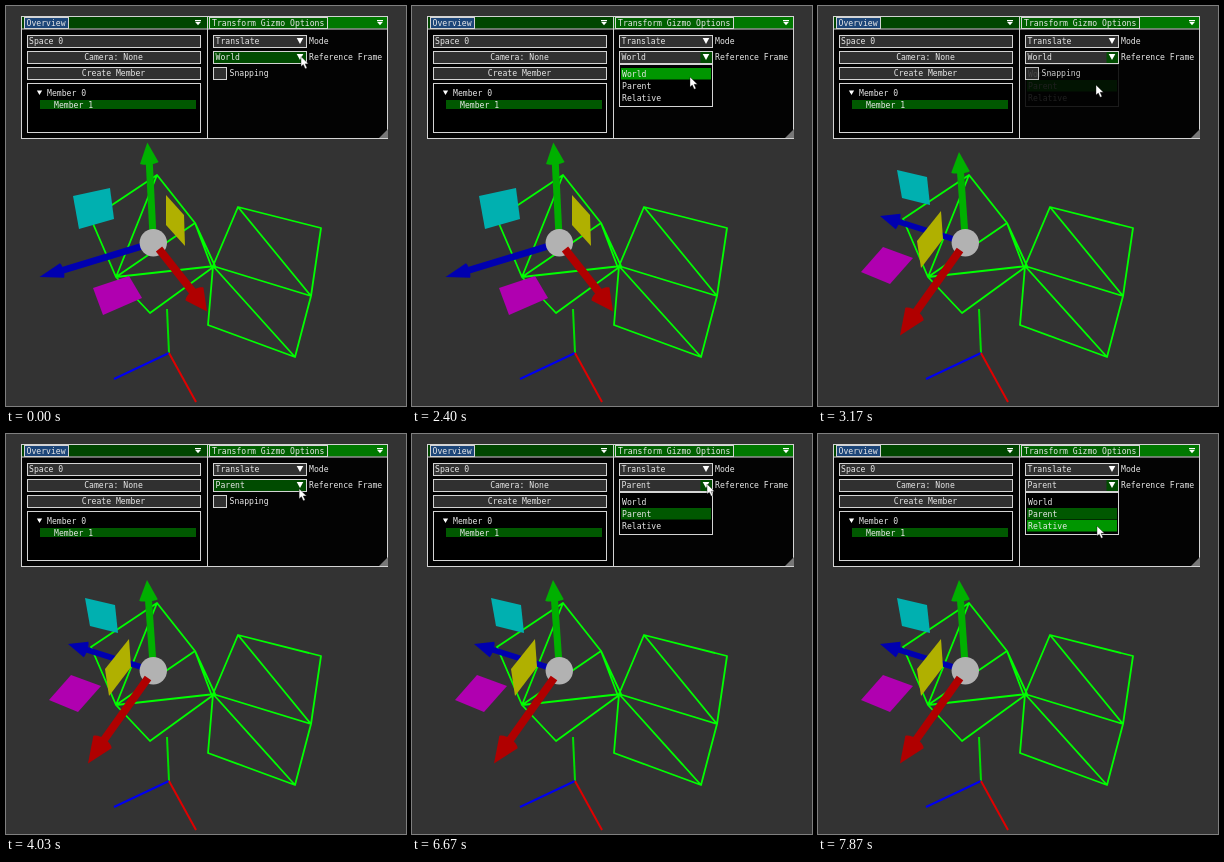
An HTML page for the animation above (8 s loop, 400 px wide and 400 px high).

```html
<!DOCTYPE html>
<html>
<head>
<meta charset="utf-8">
<style>
html, body { margin: 0; width: 100%; height: 100%; overflow: hidden; background: #333; }
svg { display: block; width: 100vw; height: 100vh; }
text { font: 8.12px "DejaVu Sans Mono", monospace; fill: #e8e8e8; white-space: pre; }
</style>
</head>
<body>
<svg id="stage" viewBox="0 0 400 400"></svg>
<script>
const stage = document.getElementById('stage');
const LOOP = 8000;
const LINE = '#d4d4d4', FIELD = '#303030', DARK = '#005800', BRIGHT = '#009600', HOVER = '#004b00';

const rect = (x, y, r, b, fill, line) =>
  `<rect x="${x + .5}" y="${y + .5}" width="${r - x}" height="${b - y}" fill="${fill}" stroke="${line || 'none'}"/>`;
const text = (x, y, s, anchor = 'start') => `<text x="${x}" y="${y}" text-anchor="${anchor}">${s}</text>`;
const poly = (pts, fill) => `<polygon points="${pts}" fill="${fill}"/>`;
const down = (x, y, w, h) => poly([x - w, y - h, x + w, y - h, x, y + h], '#fff');
const path = (d, color, width) =>
  `<path d="${d}" fill="none" stroke="${color}" stroke-width="${width}" stroke-linejoin="round"/>`;
const group = (id, body) => `<g id="${id}">${body}</g>`;

// Shaft from a to b, then a cone with a rounded base ending at the tip
function arrow(a, b, tip, half, width, color, bulge) {
  const dx = tip[0] - b[0], dy = tip[1] - b[1], len = Math.hypot(dx, dy);
  const ux = dx / len, uy = dy / len;
  const at = (along, side) => `${b[0] + ux * along - uy * side} ${b[1] + uy * along + ux * side}`;
  return path(`M${a} L${b}`, color, width) +
    `<path fill="${color}" d="M${tip} L${at(0, half)} C${at(-bulge, half * .7)} ${at(-bulge, -half * .7)} ${at(0, -half)}Z"/>`;
}

const ball = '<circle cx="147.3" cy="236.7" r="13.7" fill="#b2b2b2"/>';
const RED = '#b00000', GREEN = '#00b000', BLUE = '#0000b0';
const CYAN = '#00b0b0', YELLOW = '#b0b000', MAGENTA = '#b000b0';

const worldGizmo =
  poly('67,190 104,182 108,213 73,223', CYAN) +
  arrow([140, 239], [56, 264.5], [33.5, 271], 7.5, 7, BLUE, 2) +
  arrow([147, 230], [143.3, 157], [141.3, 136.5], 9.3, 7, GREEN, 2) +
  poly('160,189 178,209 179,240 160,219', YELLOW) +
  ball +
  arrow([153, 243], [188.5, 288], [201, 305.5], 11, 8, RED, 5) +
  poly('87,282 123,270 136,292 97,309', MAGENTA);

const parentGizmo =
  poly('79,164 109,171 112,199 84,192', CYAN) +
  arrow([140, 234.5], [80, 215.5], [62, 210], 8, 6, BLUE, 2) +
  arrow([147, 230], [142.5, 166], [141, 146], 9.3, 7, GREEN, 2) +
  ball +
  poly('99,235 123,205 125,233 103,262', YELLOW) +
  arrow([142, 244], [96.5, 308], [82, 329.5], 11, 8, RED, 5) +
  poly('43,266 65,241 95,252 72,278', MAGENTA);

const mesh =
  path('M232 201 L315 222 L305 290 L289 351 L202 319 L207 260Z L305 290 L207 260 L289 351' +
    'M151 169 L189 217 L209 260 L110 271 L144 307 L206 262 L189 217 L110 271 L151 169 L85 213 L110 271', '#00ff00', 1.8);

const axes =
  path('M161 303 L163 347', '#00e000', 2) +
  path('M163 347 L108 373', '#0000f0', 2) +
  path('M163 347 L190 396', '#e00000', 2);

const menuMark = x => path(`M${x - 3} 14.5 H${x + 3}`, '#fff', 1) + down(x, 17.5, 3, 1.7);

const panel =
  rect(15, 10, 201, 132, '#030303', LINE) +
  rect(201, 10, 381, 132, '#030303', LINE) +
  rect(15.5, 10.5, 200.5, 22, '#004600') +
  rect(201.5, 10.5, 380.5, 22, '#007800') +
  path('M15.5 23 H382', LINE, 1) +
  rect(18, 11, 62, 22, '#1c4578', LINE) +
  rect(203, 11, 321, 22, '#006000', LINE) +
  text(20.5, 19.8, 'Overview') + text(206, 19.8, 'Transform Gizmo Options') +
  menuMark(192) + menuMark(374) +
  [29, 45, 61].map(y => rect(21, y, 194, y + 12, FIELD, LINE)).join('') +
  text(23, 38, 'Space 0') + text(107.5, 54, 'Camera: None', 'middle') + text(107.5, 70, 'Create Member', 'middle') +
  rect(21, 77, 194, 126, '#000', LINE) +
  down(33.5, 86.7, 2.6, 2.3) + text(41, 89.7, 'Member 0') +
  rect(33.5, 93.5, 189.5, 102.5, DARK) + text(48, 101.5, 'Member 1') +
  rect(207, 29, 300, 41, FIELD, LINE) + text(209.5, 38, 'Translate') + down(294, 35, 3.3, 3) +
  text(303, 38, 'Mode') + text(303, 54, 'Reference Frame') +
  rect(207, 61, 220, 73, FIELD, LINE) + text(223.5, 70, 'Snapping') +
  poly('373,132 382,132 382,123', '#777');

const combo =
  `<g id="field"></g>` + down(294, 51, 3.3, 3);

stage.innerHTML = mesh + axes + group('world', worldGizmo) + group('parent', parentGizmo) +
  panel + combo + group('popup', '') +
  '<path id="cursor" d="M0 0 V10 L2.3 8 L4.2 12.2 L6 11.4 L4.1 7.3 H7.4Z" fill="#fff" stroke="#111" stroke-width=".4"/>';

const $ = id => document.getElementById(id);
const mouse = [[0, 295, 50.5], [2030, 295, 50.5], [2400, 278, 71], [2700, 278, 79], [3350, 278, 79],
  [3900, 293, 55], [4730, 295, 50], [6930, 295, 50], [7730, 279, 91], [7870, 279, 92], [LOOP, 279, 92]];

function mouseAt(t) {
  const i = Math.max(1, mouse.findIndex(k => k[0] > t));
  const a = mouse[i - 1], b = mouse[i];
  let u = (t - a[0]) / (b[0] - a[0]);
  u = u * u * (3 - 2 * u);
  return [a[1] + (b[1] - a[1]) * u, a[2] + (b[2] - a[2]) * u];
}

const items = ['World', 'Parent', 'Relative'];

function draw(t) {
  const [x, y] = mouseAt(t);
  const open = (t >= 1700 && t < 3100) || t >= 6670;
  const fade = open ? 1 : t >= 3100 && t < 3240 ? .4 * (1 - (t - 3100) / 100) : 0;
  const picked = t < 3100 ? 0 : 1;
  const shown = t < 3200 ? 0 : 1;
  const hover = !open && y < 58;
  const under = open && y >= 62 ? Math.min(2, Math.floor((y - 62) / 12)) : -1;

  $('world').style.display = picked ? 'none' : '';
  $('parent').style.display = picked ? '' : 'none';
  $('field').innerHTML = rect(207, 45, 300, 57, hover ? HOVER : FIELD, LINE) +
    (open || hover || fade > 0 ? rect(288, 45.5, 299.5, 56.5, HOVER) : '') +
    text(209.5, 54, items[shown]);

  $('popup').setAttribute('opacity', Math.max(0, fade));
  $('popup').innerHTML = rect(207, 58, 300, 100, '#000', LINE) + items.map((name, i) => {
    const top = 61.5 + 12 * i;
    const fill = i === under || (!open && i === 1) ? BRIGHT : i === picked ? DARK : 'none';
    return rect(208.5, top, 298.5, top + 11.5, fill) + text(210, top + 9.2, name);
  }).join('');
  $('cursor').setAttribute('transform', `translate(${x} ${y})`);
}

function tick() {
  draw(performance.now() % LOOP);
  requestAnimationFrame(tick);
}
tick();
</script>
</body>
</html>
```
